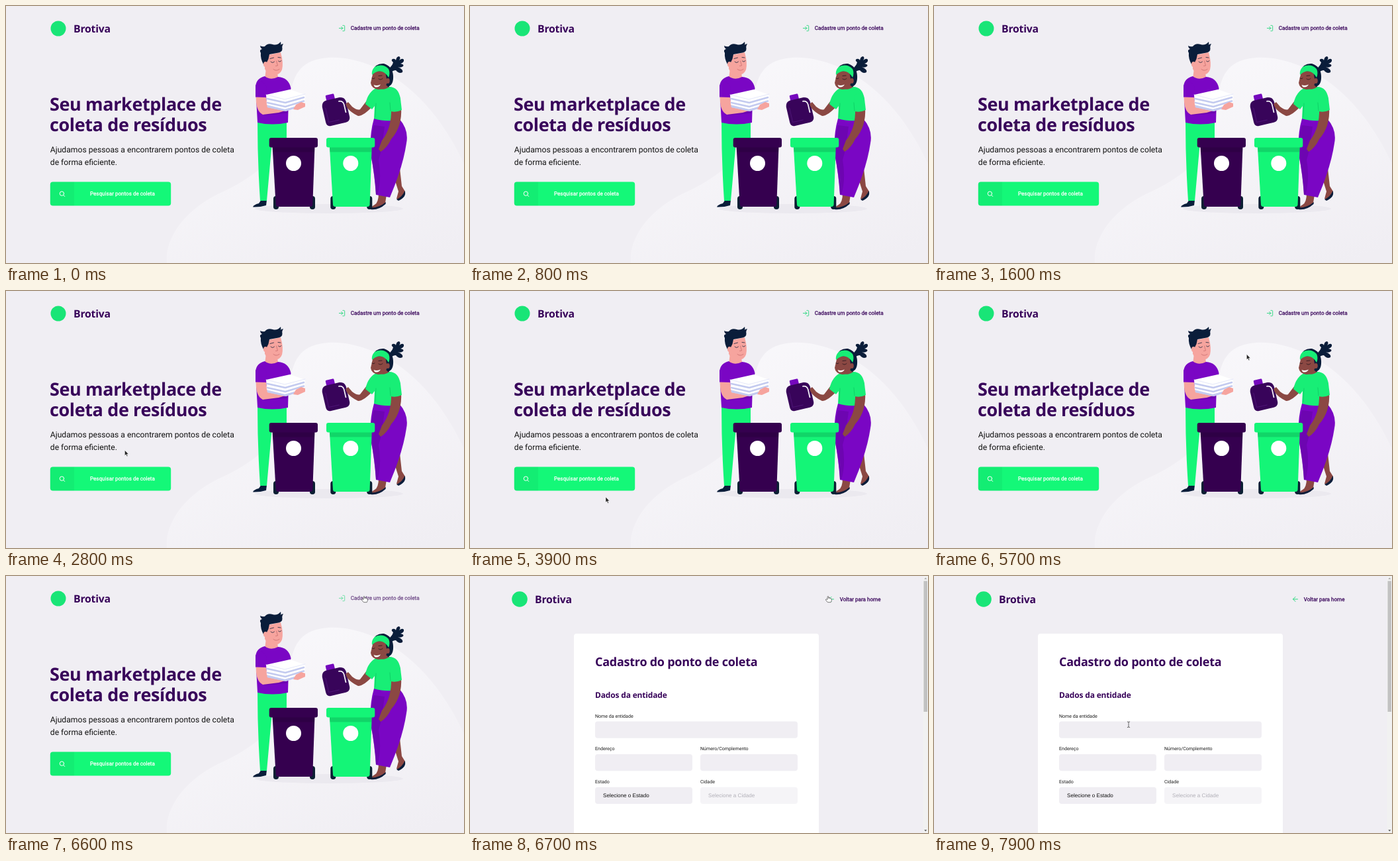
These frames come from a looping animation (692 by 388 pixels, 8000 ms). An HTML page:

```html
<!DOCTYPE html>
<html lang="pt-BR">
<head>
<meta charset="utf-8">
<title>Pontos de coleta</title>
<style>
html, body { margin: 0; width: 100%; height: 100%; overflow: hidden; background: #f0eef3; }
svg { display: block; width: 100%; height: 100%; font-family: Roboto, sans-serif; text-rendering: geometricPrecision; }
.title { font-family: "Noto Sans", "Open Sans", sans-serif; font-weight: 700; letter-spacing: -.014em; fill: #38045a; }
.brand { font-size: 15.8px; }
.strong { font-size: 8.106px; fill: #38045a; stroke: #38045a; stroke-width: .28px; }
.lead { font-size: 12.16px; fill: #111; }
.label { font-size: 7.09px; fill: #1c1c1c; }
.select { font: 8.106px "Liberation Sans", Arial, sans-serif; }
.icon { fill: none; stroke: #2bd97f; stroke-width: 2; stroke-linecap: round; stroke-linejoin: round; }
.ink { fill: none; stroke-linecap: round; stroke-linejoin: round; }
</style>
</head>
<body>
<svg viewBox="0 0 692 388">
  <defs>
    <linearGradient id="haze" x1=".3" y1="0" x2=".85" y2="1">
      <stop offset="0" stop-color="#f9f8fb"/><stop offset="1" stop-color="#f0eef3"/>
    </linearGradient>
    <g id="bin">
      <rect x="404" y="287" width="8" height="20" rx="3.8" fill="#0b1f33"/>
      <rect x="459" y="287" width="8" height="20" rx="3.8" fill="#0b1f33"/>
      <path fill="currentColor" d="M402.500 211H466.500L463.300 300Q463 303 460 303H411Q408 303 407.700 300Z"/>
      <path fill="#000" opacity=".13" d="M402.500 213H466.500L466.200 220.500H403Z"/>
      <rect x="397.700" y="199" width="73.300" height="14.500" rx="3" fill="currentColor"/>
      <circle cx="434.500" cy="237.500" r="11.500" fill="#fff"/>
    </g>
  </defs>
  <rect width="692" height="388" fill="#f0eef3"/>

  <g id="home">
    <path fill="url(#haze)" d="M243 388C239 348 274 306 322 283C372 260 412 232 422 180C430 130 430 100 458 85C490 70 535 80 570 98C625 127 665 180 692 238V388Z"/>
    <circle cx="79" cy="34" r="11.500" fill="#19e577"/>
    <text class="title brand" x="102" y="39.500">Brotiva</text>
    <g id="link">
      <g class="icon" transform="translate(502 28) scale(.46)"><path d="M15 3h4a2 2 0 0 1 2 2v14a2 2 0 0 1-2 2h-4M10 17l5-5-5-5M15 12H3"/></g>
      <text class="strong" x="520.700" y="36.200">Cadastre um ponto de coleta</text>
    </g>
    <g class="title" font-size="27">
      <text x="66" y="158">Seu marketplace de</text>
      <text x="66" y="189.300">coleta de resíduos</text>
    </g>
    <text class="lead" x="66.800" y="220.700">Ajudamos pessoas a encontrarem pontos de coleta</text>
    <text class="lead" x="66.800" y="240">de forma eficiente.</text>
    <rect id="button" x="66.800" y="265.600" width="182.400" height="36" rx="4"/>
    <path fill="#000" opacity=".045" d="M70.800 265.600H103V301.600H70.800Q66.800 301.600 66.800 297.600V269.600Q66.800 265.600 70.800 265.600Z"/>
    <path class="ink" stroke="#fff" d="M87.600 283.200a3.200 3.200 0 1 1-6.400 0a3.200 3.200 0 1 1 6.400 0M86.800 285.600L88.700 287.500"/>
    <text class="strong" x="127" y="286.200" style="fill:#fff;stroke:#fff">Pesquisar pontos de coleta</text>

    <ellipse cx="488" cy="306" rx="112" ry="7" fill="#ebe9ef"/>

    <!-- man -->
    <path fill="#0a1d3a" d="M386 292L394 293L393 301Q383 304 373 303.500Q374 300 382 298Z"/>
    <path fill="#14f577" d="M380 174H424V205H402L394 294H384Q380 235 380 174Z"/>
    <path fill="#f6a49e" d="M393 94L391 110Q400 116 411 109L410 99Z"/>
    <path fill="#7a06c4" d="M391 106Q400 113 411 107Q427 108 430.500 124L427 140L426 176Q402 181 380 176L377 122Q378 109 391 106Z"/>
    <path fill="#6304a2" d="M384 141L394 140L421 157L426 158V162L390 165Z" opacity=".5"/>
    <path fill="#f6a49e" d="M378 133L392 134L395 150L413 153L425 157L412 161L388 164Q376 158 378 133Z"/>
    <path fill="#7a06c4" d="M377 120Q386 108 393 121L394 138L377 137.500Z"/>
    <path fill="#f6a49e" d="M391 75L415 70Q419.500 86 417 96Q414 105 403 103.500Q394 102 391 95Z"/>
    <path fill="#0a1d3a" d="M384 60Q388 62 391 61Q395 55.500 403 58Q410 60 415 54Q416 57 414.500 58.500Q418 57 419 57Q416.500 61 417.500 64Q418 70 409 71L398 73L396.500 80L394 85L389.500 89Q384 79 385 71Q382 66 387 65Q384 63 384 60Z"/>
    <ellipse cx="392" cy="88" rx="3" ry="4" fill="#f6a49e"/>
    <path class="ink" stroke="#15213c" stroke-width=".8" d="M400 84Q402.500 87 405.500 84M411.500 83Q414 85.500 416 82.500M399 79.500L404.500 78M411 77.500L415 78"/>
    <path class="ink" stroke="#c96f70" stroke-width=".8" d="M408.500 83L410.500 90L407.500 90.500M404 95.500Q408 99 413 95.500"/>

    <!-- papers -->
    <path fill="#cdd3f2" d="M394 148L421 153L451 145L451 150L423 159L395 153Z"/>
    <path fill="#fff" d="M393 134L429 126L452 134L451 148L421 156L394 149Z"/>
    <path class="ink" stroke="#c3caef" stroke-width="2.500" d="M395 140L422 146L450 138M395 146L422 152L450 143.500M396 152L422 157.500L450 149"/>
    <path class="ink" stroke="#dde1f8" stroke-width=".8" d="M393 134L421 141L452 133"/>
    <path fill="#f6a49e" d="M438 149L446 145L452 147L452 152L441 157L434 156Z"/>

    <!-- jug -->
    <g transform="rotate(-13 497 158)">
      <rect x="488" y="132.500" width="13" height="9" rx="1.500" fill="#7508bd"/>
      <path fill="#38045a" d="M487 140H508Q516 141 516.500 149V172Q516 179 509 179H486Q479.500 179 479.500 172V149Q480 141 487 140Z"/>
      <path class="ink" stroke="#f4f2f7" stroke-width="1.800" d="M506 145.500Q512 146 512.500 152V164"/>
      <path class="ink" stroke="#4d1475" d="M484 151V173H500"/>
    </g>

    <!-- woman -->
    <path fill="#8b4843" d="M583 248L595 245L598 272L603 280Q603 288 594 293L590 291L593 280Z"/>
    <path fill="#0a1d3a" d="M602.500 279Q606 288 593 294L590 292Q599 288 602.500 279Z"/>
    <path fill="#8b4843" d="M563 282L575 285L573 297Q565 306 551 307Q550 304 557 300Q563 297 563 282Z"/>
    <path fill="#0a1d3a" d="M551 304.500Q563 305 574 296L573.500 299Q563 308.500 551 307Z"/>
    <path fill="#7a06c4" d="M556 170H594Q609 187 605 207Q600 242 580 289L559 285Q557 253 551 224Q549 194 556 170Z"/>
    <path fill="#6304a2" opacity=".55" d="M556 180L572 182L567 218L563 232Q568 262 561 285L559 285Q557 253 551 224Q550 198 556 180Z"/>
    <path fill="#8b4843" d="M548 139L556 149Q541 166 532 166Q521 161 515 153L513 148L517 145L523 152Q531 158 535 156Z"/>
    <path fill="#8b4843" d="M563 111L579 109L579 129Q568 135 559 127Z"/>
    <path fill="#18ee76" d="M561 123Q570 129 579 122Q593 122 596 140L594 171Q577 176 556 170L557 151L553 156L543 148Q547 129 561 123Z"/>
    <path fill="#8b4843" d="M582 155L597 153Q599 182 582 201Q576 214 566 220L563 216L568 203Q583 184 582 155Z"/>
    <path fill="#18ee76" d="M580 135Q592 127 596 140L598 157Q590 161 581 159Z"/>
    <path class="ink" stroke="#0dc962" stroke-width=".8" d="M559 147L558 168M580 146L581 158"/>
    <path fill="#0a1d3a" d="M554 98Q558 86 571 87Q584 91 585 105Q586 119 577 122L560 104Z"/>
    <path fill="#0a1d3a" d="M577 96Q584 90 585 85Q581 82 584 80Q588 79 589 82Q590 76 594 76Q597 78 594 82Q599 78 601 81Q602 85 596 87Q602 88 600 91Q596 94 592 92Q601 96 599 100Q594 103 589 97Q585 97 580 101Z"/>
    <path fill="#8b4843" d="M555 99L573 98L576 116Q571 127 562 126Q552 124 551 116Z"/>
    <ellipse cx="577" cy="113" rx="2.800" ry="4" fill="#8b4843"/>
    <path fill="#18ee76" d="M557 92Q569 86 578 95Q581 101 578 108Q574 101 568 99Q561 97 553 104Q552 97 557 92Z"/>
    <path class="ink" stroke="#24151d" stroke-width=".8" d="M553 109Q555 111 557 109M563 110Q566 112.500 569 109.500M563 105.500L568 105"/>
    <path fill="#fff" d="M555.500 119Q561 121 566 118.500Q563 124 557 122Z"/>

    <use href="#bin" color="#35004f"/>
    <use href="#bin" x="86.300" color="#14f577"/>
  </g>

  <g id="form">
    <circle cx="75" cy="35" r="11.800" fill="#19e577"/>
    <text class="title brand" x="98" y="41">Brotiva</text>
    <g class="icon" transform="translate(540 29) scale(.5)"><path d="M19 12H5M12 19l-7-7 7-7"/></g>
    <text class="strong" x="558.700" y="37.900">Voltar para home</text>
    <rect x="157" y="87" width="370" height="310" rx="4" fill="#fff"/>
    <text class="title" font-size="18" x="189" y="136">Cadastro do ponto de coleta</text>
    <text class="title" font-size="12" x="189" y="184">Dados da entidade</text>
    <g fill="#f0eef3">
      <rect x="189" y="219.500" width="306" height="25.300" rx="4"/>
      <rect x="189" y="269" width="147" height="25.300" rx="4"/>
      <rect x="348" y="269" width="147" height="25.300" rx="4"/>
      <rect x="189" y="318.700" width="147" height="25.300" rx="4"/>
      <rect x="348" y="318.700" width="147" height="25.300" rx="4" opacity=".65"/>
    </g>
    <g class="label">
      <text x="189" y="213.800">Nome da entidade</text>
      <text x="189" y="263.400">Endereço</text>
      <text x="348" y="263.400">Número/Complemento</text>
      <text x="189" y="313">Estado</text>
      <text x="348" y="313">Cidade</text>
    </g>
    <text class="select" x="201" y="334" fill="#111">Selecione o Estado</text>
    <text class="select" x="360" y="334" fill="#b2b0b8">Selecione a Cidade</text>
    <rect x="684.500" width="7.500" height="388" fill="#f1f1f1"/>
    <rect x="685.500" y="7.500" width="5.500" height="197.500" fill="#c1c1c1"/>
    <path fill="#a3a3a3" d="M686.300 4.700L688.300 2.500L690.300 4.700Z"/>
    <path fill="#505050" d="M686.300 383.300L688.300 385.500L690.300 383.300Z"/>
  </g>

  <g id="cursor">
    <path id="arrow" fill="#222" stroke="#fff" stroke-width=".5" d="M0 0V8L1.900 6.400L3.200 9.400L4.500 8.800L3.200 5.900H5.700Z"/>
    <path id="hand" fill="#fff" stroke="#444" stroke-width=".7" stroke-linejoin="round" d="M-.9 5V.7Q0-.6 .9 .7V3.300Q2-.1 2.700 3.400Q3.700 2.600 4.100 3.900Q5.400 3.400 5.300 5Q5.400 7.500 4.200 9.200H-.6L-3.600 5.600Q-3.300 4-2.200 4.400Z"/>
    <path id="beam" class="ink" stroke="#444" stroke-width=".8" d="M-1.700-4.300Q0-4.300 0-3.300Q0-4.300 1.700-4.300M0-3.300V3.300M-1.700 4.300Q0 4.300 0 3.300Q0 4.300 1.700 4.300"/>
  </g>
</svg>
<script>
const LOOP = 8000, ENTER = 1000, SWITCH = 6700, FADE = 200;
const $ = id => document.getElementById(id);
const show = (id, on) => { $(id).style.display = on ? '' : 'none'; };

// time, x, y, pointer shape from then on
const path = [
  [ENTER, 16, 200, 'arrow'], [1380, 70, 190, 'beam'], [1600, 123, 181, 'beam'],
  [2000, 150, 190, 'beam'], [2700, 178, 230, 'arrow'], [3050, 183, 266, 'hand'],
  [3500, 180, 302, 'arrow'], [3700, 180, 317, 'arrow'], [3900, 205, 311, 'arrow'],
  [4100, 206, 308, 'arrow'], [4400, 206, 308, 'arrow'], [4530, 216, 301, 'hand'],
  [4900, 249, 286, 'arrow'], [5000, 284, 277, 'arrow'], [5200, 345, 215, 'arrow'],
  [5600, 455, 112, 'arrow'], [6100, 541, 30.5, 'hand'], [7300, 541, 30.5, 'arrow'],
  [7600, 448, 112, 'arrow'], [7870, 304, 219, 'beam'], [7900, 294, 224.3, 'beam'],
  [LOOP, 294, 224.3, 'beam']
];

// 0..1 hover strength with a short fade at both ends
const hover = (t, on, off) => Math.max(0, Math.min(1, (t - on) / FADE, (off + FADE - t) / FADE));
const mix = (a, b, k) => a + (b - a) * k;

function draw(t) {
  show('home', t < SWITCH);
  show('form', t >= SWITCH);

  const h = Math.max(hover(t, 3050, 3500), hover(t, 4530, 4950));
  $('button').setAttribute('fill', `rgb(20 ${mix(248, 226, h)} ${mix(120, 112, h)})`);
  $('link').setAttribute('opacity', 1 - .3 * hover(t, 6080, SWITCH));

  show('cursor', t >= ENTER);
  if (t < ENTER) return;
  const i = path.findIndex(p => p[0] > t);
  const [t0, x0, y0, shape] = path[i - 1], [t1, x1, y1] = path[i];
  const k = (t - t0) / (t1 - t0);
  $('cursor').setAttribute('transform', `translate(${mix(x0, x1, k)} ${mix(y0, y1, k)})`);
  for (const s of ['arrow', 'hand', 'beam']) show(s, s === shape);
}

const start = performance.now();
function frame() {
  draw((performance.now() - start) % LOOP);
  requestAnimationFrame(frame);
}
frame();
</script>
</body>
</html>
```
